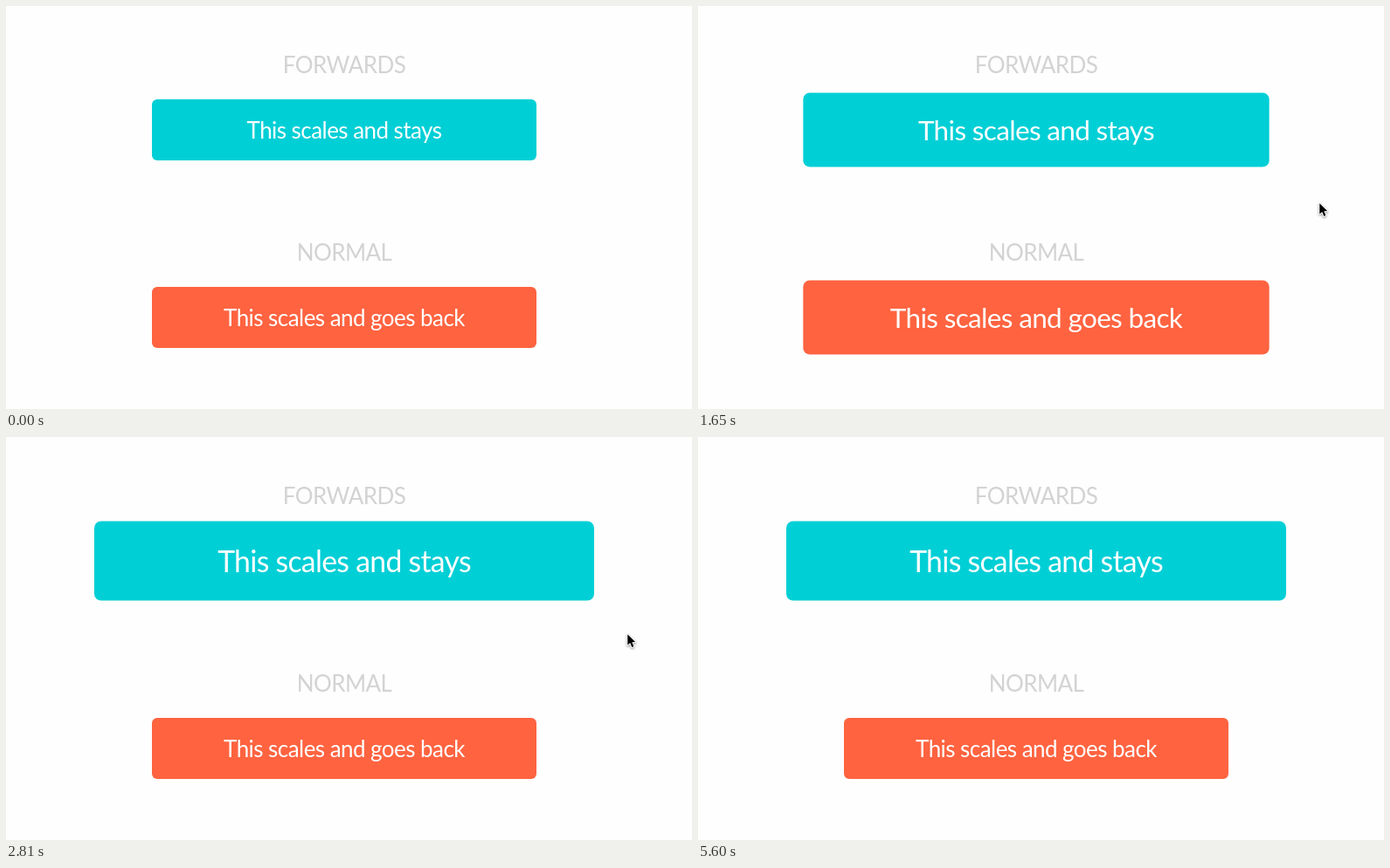
An HTML page with a canvas that plays this animation: 785x462 px, repeating every 6550 ms.

```html
<!DOCTYPE html>
<html lang="en">
<head>
<meta charset="utf-8">
<title>Fill modes</title>
<style>
html, body { margin: 0; width: 100%; height: 100%; overflow: hidden; background: #fefefe; }
canvas { display: block; width: 785px; height: 462px; }
</style>
</head>
<body>
<canvas id="stage" width="785" height="462"></canvas>
<script>
const W = 785, H = 462, LOOP = 6550;
const canvas = document.getElementById('stage');
const ratio = window.devicePixelRatio || 1;
canvas.width = W * ratio;
canvas.height = H * ratio;
const ctx = canvas.getContext('2d');

const CX = 387;
const GROW = { start: 893, length: 1815, reset: 2810, by: 0.3 };
const ARROW = [[0, 0], [0, 12.4], [2.9, 9.7], [5, 14.8], [7.1, 13.9], [5, 9], [8.8, 8.8]];

const clamp = v => Math.min(1, Math.max(0, v));

// CSS "ease": cubic-bezier(.25, .1, .25, 1)
function ease(x) {
  if (x <= 0 || x >= 1) return clamp(x);
  const bez = (a, b, t) => 3 * a * t * (1 - t) ** 2 + 3 * b * t * t * (1 - t) + t ** 3;
  let lo = 0, hi = 1;
  for (let i = 0; i < 30; i++) {
    const mid = (lo + hi) / 2;
    if (bez(0.25, 0.25, mid) < x) lo = mid; else hi = mid;
  }
  return bez(0.1, 1, lo);
}

// Curve from a to b over d ms with end speeds va and vb
function glide(u, a, b, va, vb, d) {
  const u2 = u * u, u3 = u2 * u;
  return a + (b - a) * (3 * u2 - 2 * u3) + d * (va * (u3 - 2 * u2 + u) + vb * (u3 - u2));
}

function pointer(t) {
  if (t < 780 || t >= 5600) return null;
  if (t < 4570) {
    const left = 1 - clamp((t - 780) / 650);
    return [711 + 2 * clamp(left * 2), 225 * (1 - left * left)];
  }
  if (t < 5200) {
    const u = (t - 4540) / 660;
    return [glide(u, 711, 725, 0, 0.045, 660), glide(u, 225, 391, 0.08, 0.22, 660)];
  }
  const u = (t - 5200) / 400;
  return [glide(u, 725, 747, 0.045, 0.055, 400), glide(u, 391, 464, 0.22, 0.17, 400)];
}

function write(text, x, y, color) {
  ctx.fillStyle = color;
  ctx.fillText(text, x, y);
}

function button(text, cy, color, scale) {
  ctx.save();
  ctx.translate(CX, cy);
  ctx.scale(scale, scale);
  ctx.fillStyle = color;
  ctx.beginPath();
  ctx.roundRect(-220, -35, 440, 70, 6);
  ctx.fill();
  write(text, 0, 10, '#fff');
  ctx.restore();
}

function drawPointer([x, y]) {
  ctx.save();
  ctx.translate(Math.round(x) + 0.3, Math.round(y) + 1.2);
  ctx.beginPath();
  ARROW.forEach(p => ctx.lineTo(...p));
  ctx.closePath();
  ctx.lineJoin = 'round';
  ctx.lineWidth = 2;
  ctx.strokeStyle = '#fff';
  ctx.shadowColor = 'rgba(0,0,0,.45)';
  ctx.shadowBlur = 2.5 * ratio;
  ctx.shadowOffsetY = ratio;
  ctx.stroke();
  ctx.shadowColor = 'transparent';
  ctx.fillStyle = '#000';
  ctx.fill();
  ctx.restore();
}

function draw(t) {
  ctx.setTransform(ratio, 0, 0, ratio, 0, 0);
  ctx.fillStyle = '#fefefe';
  ctx.fillRect(0, 0, W, H);
  ctx.font = '400 26px Lato, sans-serif';
  ctx.letterSpacing = '-0.55px';
  ctx.textAlign = 'center';
  ctx.textBaseline = 'alphabetic';

  const scale = 1 + GROW.by * ease((t - GROW.start) / GROW.length);
  write('FORWARDS', CX, 77, '#d3d3d3');
  button('This scales and stays', 142, '#00cfd6', scale);
  write('NORMAL', CX, 292, '#d3d3d3');
  button('This scales and goes back', 357, '#ff6340', t < GROW.reset ? scale : 1);

  const tip = pointer(t);
  if (tip) drawPointer(tip);
}

const begin = performance.now();
function tick() {
  draw((performance.now() - begin) % LOOP);
  requestAnimationFrame(tick);
}
tick();
</script>
</body>
</html>
```
